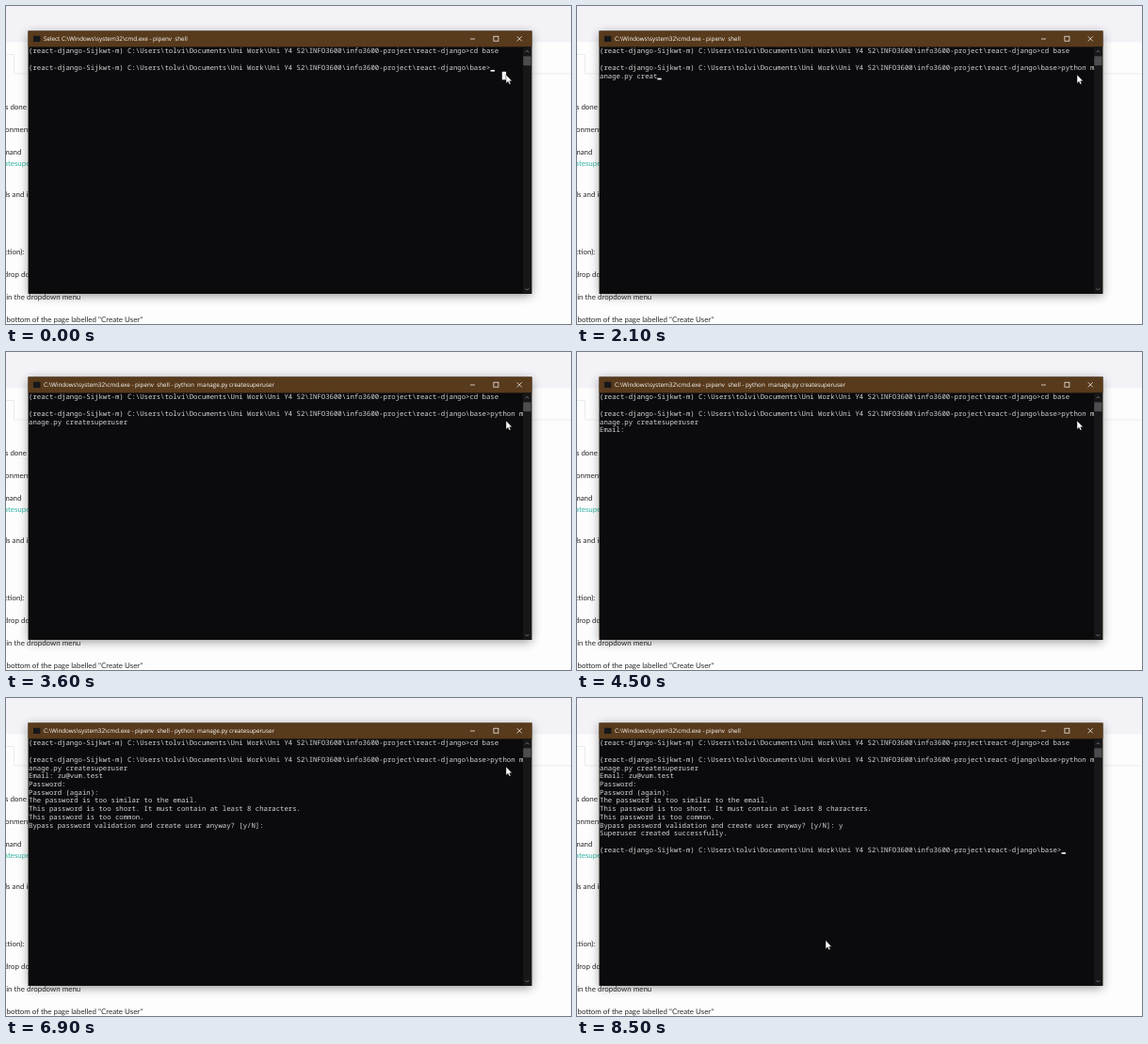
An HTML page for the animation above (8.6 s loop, 600 by 338 pixels).

```html
<!DOCTYPE html>
<html lang="en">
<head>
<meta charset="utf-8">
<title>Creating a superuser</title>
<style>
  html, body { margin: 0; width: 100%; height: 100%; overflow: hidden; background: #fdfdfd; }
  svg { display: block; width: 600px; height: 338px; }
  text { white-space: pre; text-rendering: geometricPrecision; }
  #page { font: 7.95px Lato, sans-serif; fill: #2c2c2c; }
  #title { font: 6.3px "Open Sans", sans-serif; fill: #fff; }
  #term { font: 7.3px "Noto Sans Mono", monospace; fill: #d6d6d6; }
  .end { text-anchor: end; }
</style>
</head>
<body>
<svg viewBox="0 0 600 338">
  <defs>
    <filter id="blur" x="-10%" y="-10%" width="120%" height="120%">
      <feGaussianBlur stdDeviation="5.5"/>
    </filter>
  </defs>

  <rect width="600" height="338" fill="#fdfdfd"/>
  <rect width="600" height="38.5" fill="#f3f2f7"/>
  <path d="M0 51.5H8.5V72H600" fill="none" stroke="#e6e8ea" stroke-width=".8"/>
  <g id="page">
    <text class="end" x="22" y="109.5">is done</text>
    <text x="-1" y="133.7">onment</text>
    <text class="end" x="16.5" y="157.8">command</text>
    <text x="-2" y="170" fill="#35b5a4">atesuperuser</text>
    <text x="-.8" y="202.5">ls and in</text>
    <text class="end" x="19.3" y="263.8">ction):</text>
    <text x="-2.2" y="288">drop down</text>
    <text class="end" x="79.3" y="312">in the dropdown menu</text>
    <text class="end" x="145.2" y="336">bottom of the page labelled "Create User"</text>
  </g>

  <rect x="24" y="29" width="534" height="279" opacity=".4" filter="url(#blur)"/>
  <rect x="23.5" y="26.4" width="535" height="279.6" fill="#33261b"/>
  <rect x="24" y="43.3" width="534" height="262.3" fill="#0b0a0d"/>
  <rect x="23.5" y="26.6" width="535" height="16.7" fill="#583a1c"/>
  <rect x="29" y="31.8" width="7.4" height="6.2" fill="#15171a"/>
  <text id="title" x="40" y="37.2"></text>
  <g fill="none" stroke="#fff" stroke-width=".7">
    <path d="M493 35H498M542.6 32.2L547.8 37.4M547.8 32.2L542.6 37.4"/>
    <rect x="517.9" y="32.2" width="5" height="5"/>
  </g>

  <rect x="549" y="43.3" width="9" height="262.3" fill="#171717"/>
  <rect x="549.3" y="53.4" width="8.2" height="9.8" fill="#4d4d4d"/>
  <path d="M551.6 49.2L553.4 47.4L555.2 49.2M551.6 300.2L553.4 302L555.2 300.2"
        fill="none" stroke="#8a8a8a" stroke-width=".8"/>

  <g id="term"></g>
  <rect id="caret" width="4.4" height="1.7" fill="#f2f2f2"/>
  <rect id="mark" x="526.8" y="69.8" width="4.3" height="8.6" fill="#f2f2f2"/>
  <path id="mouse" d="M0 0V9.2L2.1 7.3L3.5 10.3L5 9.6L3.7 6.8H6.4Z"
        fill="#fff" stroke="#111" stroke-width=".45"/>
</svg>

<script>
const LOOP = 8600, STEP = 100;
const COLS = 120, CELL_W = 4.38, CELL_H = 8.74, LEFT = 24, TOP = 43.6;
const ROOT = '(react-django-Sijkwt-m) C:\\Users\\tolvi\\Documents\\Uni Work\\Uni Y4 S2' +
  '\\INFO3600\\info3600-project\\react-django';
const PROMPT = ROOT + '\\base>';
const SHELL = 'C:\\Windows\\system32\\cmd.exe - pipenv  shell';
const COMMAND = 'python manage.py createsuperuser';
const EMAIL = 'zu@vum.test';

// [time, characters typed]
const COMMAND_KEYS = [[500, 0], [1200, 14], [1400, 16], [1600, 17], [2700, 28], [2900, 32]];
const EMAIL_KEYS = [[4800, 0], [5700, 11]];
const CARET_OFF = [[3500, 3900], [4400, 4900], [5700, 6000], [6800, 7200]];

const $ = id => document.getElementById(id);
const lines = Array.from({ length: 15 }, (_, row) => {
  const line = document.createElementNS('http://www.w3.org/2000/svg', 'text');
  line.setAttribute('x', LEFT);
  line.setAttribute('y', TOP + row * CELL_H + 6.7);
  return $('term').appendChild(line);
});

function ramp(keys, t) {
  if (t <= keys[0][0]) return keys[0][1];
  for (let i = 1; i < keys.length; i++) {
    const [t0, v0] = keys[i - 1], [t1, v1] = keys[i];
    if (t <= t1) return v0 + (v1 - v0) * (t - t0) / (t1 - t0);
  }
  return keys[keys.length - 1][1];
}

const typed = (text, keys, t) => text.slice(0, Math.round(ramp(keys, t)));

function screenText(t) {
  let s = ROOT + '>cd base\n\n' + PROMPT + typed(COMMAND, COMMAND_KEYS, t);
  if (t >= 3100) s += '\n';
  if (t >= 4200) s += 'Email: ' + typed(EMAIL, EMAIL_KEYS, t);
  if (t >= 5900) s += '\nPassword: ';
  if (t >= 6300) s += '\nPassword (again): ';
  if (t >= 6700) s += '\nThe password is too similar to the email.' +
    '\nThis password is too short. It must contain at least 8 characters.' +
    '\nThis password is too common.' +
    '\nBypass password validation and create user anyway? [y/N]: ';
  if (t >= 7500) s += t < 7800 ? 'u' : t < 7900 ? '' : 'y';
  if (t >= 8100) s += '\n';
  if (t >= 8200) s += 'Superuser created successfully.\n';
  if (t >= 8300) s += '\n' + PROMPT;
  return s;
}

// Wrap at the console width
function wrap(text) {
  return text.split('\n').flatMap(line => {
    const rows = [line.slice(0, COLS)];
    for (let i = COLS; i < line.length; i += COLS) rows.push(line.slice(i, i + COLS));
    return rows;
  });
}

function draw(t) {
  const selecting = t < 300;
  const running = t >= 3100 && t < 8300;
  $('title').textContent = (selecting ? 'Select ' : '') + SHELL +
    (running ? ' - python  manage.py createsuperuser' : '');
  $('mark').style.display = selecting ? '' : 'none';

  const rows = wrap(screenText(t));
  lines.forEach((line, i) => line.textContent = rows[i] || '');

  const last = rows.length - 1;
  $('caret').setAttribute('x', LEFT + rows[last].length * CELL_W);
  $('caret').setAttribute('y', TOP + (last + 1) * CELL_H - 1.9);
  $('caret').style.display = CARET_OFF.some(([a, b]) => t >= a && t < b) ? 'none' : '';

  const x = ramp([[8300, 531], [8500, 264]], t);
  const y = ramp([[8300, 73], [8500, 257.5]], t);
  $('mouse').setAttribute('transform', `translate(${x} ${y})`);
}

function tick() {
  const t = performance.now() % LOOP;
  draw(Math.floor(t / STEP) * STEP);
  requestAnimationFrame(tick);
}
tick();
</script>
</body>
</html>
```
